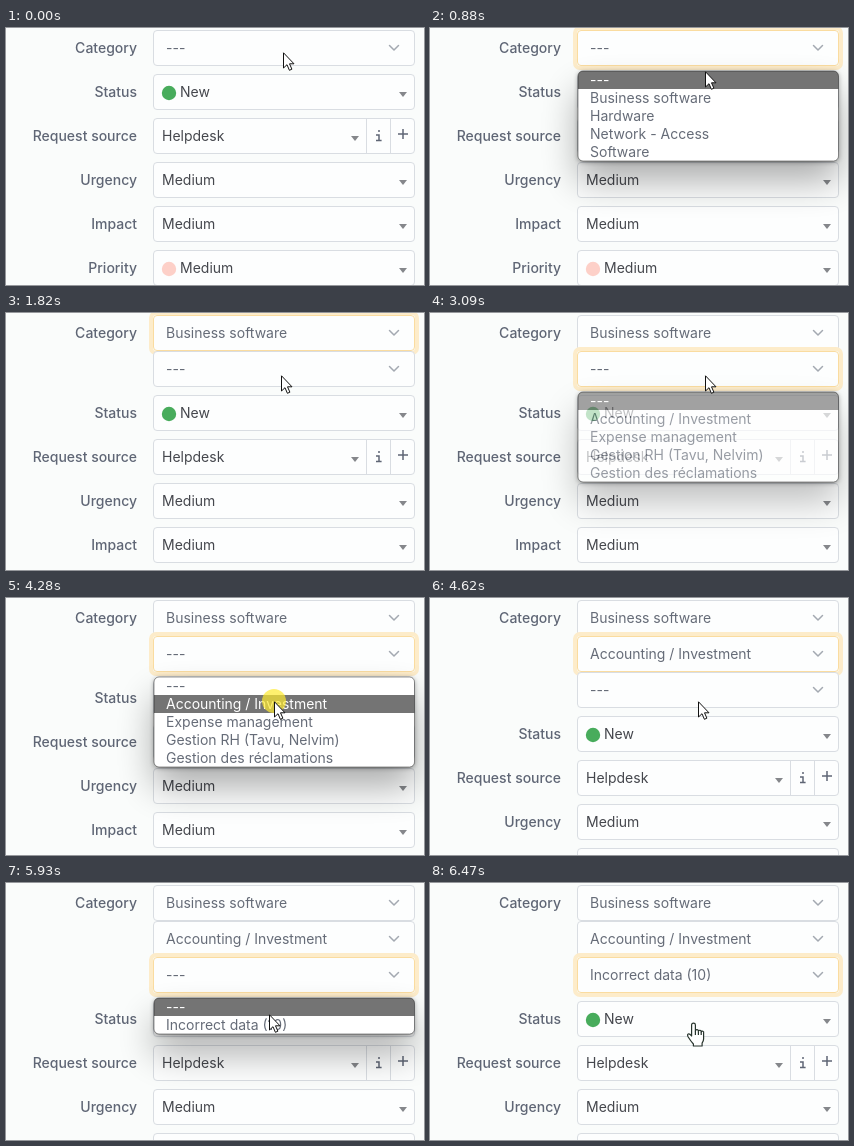
An HTML page for the animation above (6810 ms loop, 418x257 px).

```html
<!DOCTYPE html>
<html lang="en">
<head>
<meta charset="utf-8">
<title>Cascading category field</title>
<style>
  html, body { margin: 0; width: 100%; height: 100%; overflow: hidden; background: #fafcfb; }
  svg { display: block; }
  text { font: 14px Inter, "Open Sans", sans-serif; white-space: pre; }
  .label { font-weight: 500; fill: #5f6675; text-anchor: end; }
  .value { fill: #45474d; }
  .choice { fill: #666c78; }
  .box { fill: #fdfefe; stroke: #d9dde2; }
  .ring { fill: none; stroke: #fdecca; stroke-width: 4; }
  .icon { fill: none; stroke: #5f6675; stroke-width: 1.5; }
</style>
</head>
<body>
<svg id="stage" width="418" height="257" viewBox="0 0 418 257">
  <defs>
    <filter id="wide" filterUnits="userSpaceOnUse" x="0" y="-60" width="520" height="400">
      <feGaussianBlur in="SourceAlpha" stdDeviation="18"/>
      <feOffset dy="20"/>
      <feComposite operator="out" in2="SourceAlpha"/>
    </filter>
    <filter id="tight" filterUnits="userSpaceOnUse" x="100" y="0" width="400" height="300">
      <feGaussianBlur in="SourceAlpha" stdDeviation="2.5"/>
      <feOffset dy="1"/>
      <feComposite operator="out" in2="SourceAlpha"/>
    </filter>
  </defs>
</svg>
<script>
const LOOP = 6810;
const LEVEL_HEIGHT = 36, OPTION_HEIGHT = 18, FADE_STEP = 70;
const stage = document.getElementById('stage');

function add(parent, tag, attrs = {}, text) {
  const node = document.createElementNS('http://www.w3.org/2000/svg', tag);
  for (const key in attrs) node.setAttribute(key, attrs[key]);
  if (text !== undefined) node.textContent = text;
  parent.appendChild(node);
  return node;
}
const show = (node, visible) => node.setAttribute('display', visible ? 'inline' : 'none');
const place = (node, x, y) => node.setAttribute('transform', `translate(${x} ${y})`);
const within = (t, from, to) => t >= from && t < to;

function addLabel(parent, text, y) {
  add(parent, 'text', { class: 'label', x: 131, y: y + 5 }, text);
}
function addBox(parent, y, extra = {}) {
  return add(parent, 'rect', { class: 'box', x: 147.5, y: y - 17.5, width: 261, height: 35, rx: 3.5, ...extra });
}

// Fixed rows, pushed down as category levels appear.
const rows = add(stage, 'g');
function addRow(label, value, y, { dot, arrowX = 397 } = {}) {
  addLabel(rows, label, y);
  addBox(rows, y);
  if (dot) add(rows, 'circle', { cx: 163, cy: y + 1, r: 7.2, fill: dot });
  add(rows, 'text', { class: 'value', x: dot ? 174 : 156, y: y + 5 }, value);
  add(rows, 'path', { d: `M${arrowX - 4} ${y}h8l-4 5z`, fill: '#85878b' });
}
addRow('Status', 'New', 64, { dot: '#48ac5c' });
addRow('Request source', 'Helpdesk', 108, { arrowX: 349 });
addRow('Urgency', 'Medium', 152);
addRow('Impact', 'Medium', 196);
addRow('Priority', 'Medium', 240, { dot: '#fdd0c8' });
add(rows, 'path', { d: 'M360.5 91v34M384.5 91v34', stroke: '#d9dde2' });
add(rows, 'path', { class: 'icon', d: 'M370 107h3v5.3M370 112.4h5.6M372 103h2' });
add(rows, 'path', { class: 'icon', d: 'M392 106h10M397 101v10' });

// Category levels: each select, its menu and the times it goes through.
const levels = [
  { shown: 0, open: 340, close: 1620, chosen: 1, circleEnd: 550,
    options: ['---', 'Business software', 'Hardware', 'Network - Access', 'Software'] },
  { shown: 1820, open: 2890, close: 4420, chosen: 1,
    options: ['---', 'Accounting / Investment', 'Expense management',
              'Gestion RH (Tavu, Nelvim)', 'Gestion des réclamations'] },
  { shown: 4620, open: 5410, close: 6470, chosen: 1,
    options: ['---', 'Incorrect data (10)'] },
];

addLabel(stage, 'Category', 20);
levels.forEach((level, i) => {
  const y = 20 + i * LEVEL_HEIGHT;
  level.group = add(stage, 'g');
  level.ring = add(level.group, 'rect', { class: 'ring', x: 145, y: y - 20, width: 266, height: 40, rx: 5 });
  level.box = addBox(level.group, y);
  level.text = add(level.group, 'text', { class: 'choice', x: 160, y: y + 5 });
  add(level.group, 'path', { d: `M383.5 ${y - 2.5}l4.5 4.5l4.5 -4.5`, fill: 'none',
    stroke: '#a4a9b1', 'stroke-width': 1.5, 'stroke-linecap': 'round', 'stroke-linejoin': 'round' });
});

levels.forEach((level, i) => {
  const top = level.menuTop = 43 + i * LEVEL_HEIGHT;
  const height = level.options.length * OPTION_HEIGHT;
  const frame = { x: 148, y: top, width: 260.5, height, rx: 5 };
  level.menu = add(stage, 'g');
  level.shadow = add(level.menu, 'rect', { ...frame, filter: 'url(#wide)' });
  add(level.menu, 'rect', { ...frame, filter: 'url(#tight)', opacity: 0.35 });
  level.content = add(level.menu, 'g');
  const clip = add(stage.querySelector('defs'), 'clipPath', { id: 'menu' + i });
  add(clip, 'rect', frame);
  const list = add(level.content, 'g', { 'clip-path': `url(#menu${i})` });
  add(list, 'rect', { ...frame, fill: '#fff' });
  level.highlight = add(list, 'rect', { x: 148, width: 261, height: OPTION_HEIGHT, fill: '#747474' });
  level.optionTexts = level.options.map((option, n) =>
    add(list, 'text', { x: 160, y: top + n * OPTION_HEIGHT + 14 }, option));
  add(level.menu, 'rect', { ...frame, fill: 'none', stroke: '#000', 'stroke-opacity': 0.42 });
});

// Pointer
const circle = add(stage, 'circle', { r: 12, fill: '#fdea30', opacity: 0.7 });
const arrow = add(stage, 'path', { fill: '#fff', stroke: '#111', 'stroke-linejoin': 'miter',
  d: 'M.5 .8V16L4 12.7L6.4 18.3L8.9 17.2L6.5 11.8H11Z' });
const hand = add(stage, 'g', { fill: '#fff', stroke: '#26332c', 'stroke-width': 1.2, 'stroke-linejoin': 'round' });
add(hand, 'path', { d: 'M4.6 13V3a1.9 1.9 0 0 1 3.8 0V9a1.5 1.5 0 0 1 3 .4a1.4 1.4 0 0 1 2.8 .6' +
  'a1.3 1.3 0 0 1 2.4 1V17q0 2 -1.5 4.2V24H6.4V22Q4 19.5 1.2 15Q0 12.6 1.2 12Q2.6 11.4 4.6 14Z' });
add(hand, 'path', { d: 'M8.4 9v4M11.4 9.5v3.5M14.2 10v3', fill: 'none' });

const start = { x: 277, y: 24 };
const moves = [
  { from: 140, to: 140, steps: 1, x: 276, y: 23 },
  { from: 740, to: 1200, steps: 8, x: 275, y: 62 },
  { from: 3410, to: 3690, steps: 5, x: 268, y: 103 },
  { from: 5703, to: 6070, steps: 6, x: 262, y: 138 },
  { from: 6130, to: 6130, steps: 1, x: 262, y: 139 },
];
const clicks = [[340, 550], [1480, 1620], [2890, 3090], [4280, 4490], [5410, 5620], [6270, 6470]];

function pointerAt(t) {
  let { x, y } = start;
  for (const move of moves) {
    if (t < move.from) break;
    const step = t >= move.to ? move.steps
      : 1 + Math.floor((t - move.from) / (move.to - move.from) * (move.steps - 1) + 0.01);
    const eased = 1 - (1 - step / move.steps) ** 1.5;
    x += (move.x - x) * eased;
    y += (move.y - y) * eased;
  }
  return { x: Math.round(x), y: Math.round(y) };
}

function drawLevel(level, t, focused, pointer) {
  show(level.group, t >= level.shown);
  show(level.ring, focused);
  level.box.style.stroke = focused ? '#fadca0' : '';
  level.text.textContent = level.options[t >= level.close ? level.chosen : 0];

  const open = within(t, level.open, level.close);
  show(level.menu, open);
  if (!open) return;
  const fade = Math.min(3, Math.floor((t - level.open) / FADE_STEP)) / 3;
  level.content.setAttribute('opacity', fade);
  level.shadow.setAttribute('opacity', 0.1 + 0.22 * fade);
  const active = Math.max(0, Math.floor((pointer.y - level.menuTop) / OPTION_HEIGHT));
  level.highlight.setAttribute('y', level.menuTop + active * OPTION_HEIGHT);
  level.optionTexts.forEach((text, n) => text.setAttribute('fill', n === active ? '#fff' : '#666c78'));
}

function render(t) {
  const pointer = pointerAt(t);
  const visible = levels.filter(level => t >= level.shown).length;
  const focused = levels.filter(level => t >= level.open + FADE_STEP).pop();
  place(rows, 0, (visible - 1) * LEVEL_HEIGHT);
  levels.forEach(level => drawLevel(level, t, level === focused, pointer));

  const overStatus = t >= 6470;
  show(arrow, !overStatus);
  show(hand, overStatus);
  place(arrow, pointer.x, pointer.y);
  place(hand, pointer.x - 5, pointer.y);
  show(circle, clicks.some(([from, to]) => within(t, from, to)));
  place(circle, pointer.x, pointer.y);
}

const origin = performance.now();
function tick() {
  render((performance.now() - origin) % LOOP);
  requestAnimationFrame(tick);
}
tick();
</script>
</body>
</html>
```
